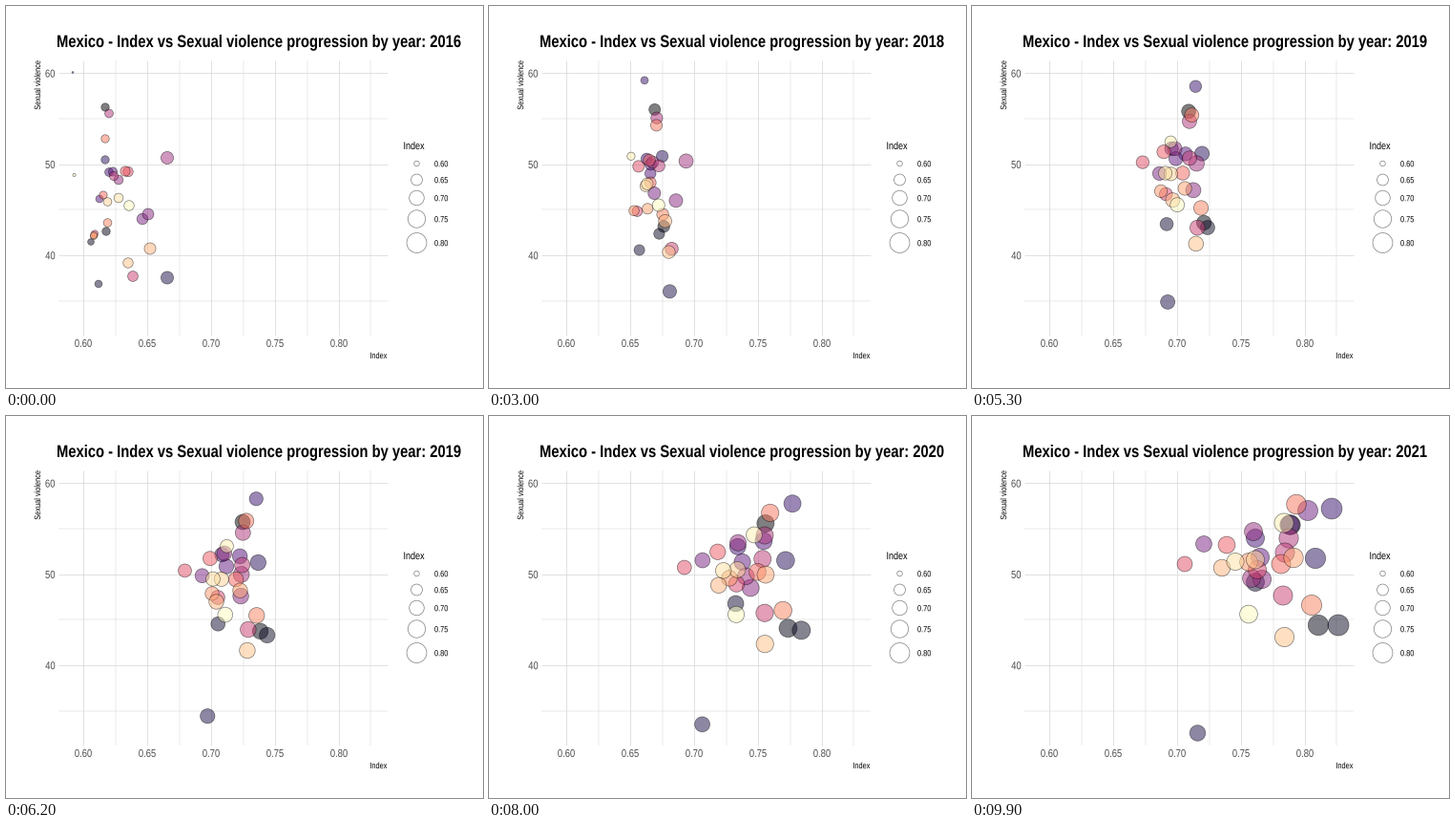
These frames come from a looping animation (500 by 400 pixels, 10 s). A matplotlib script:

```python
import matplotlib.pyplot as plt
import numpy as np
from matplotlib.animation import FuncAnimation
from matplotlib.patches import Circle, PathPatch
from matplotlib.textpath import TextPath
from matplotlib.transforms import Affine2D

W, H, DPI = 500, 400, 100
PX = 72 / DPI                      # one pixel in points
FRAMES, INTERVAL = 100, 100
FIRST_YEAR, LAST_YEAR = 2016, 2021
LEFT, RIGHT, TOP, BOTTOM = 54.5, 400, 56.5, 345
NARROW = 0.82                      # condensed cut of the sans face
EDGE = (0, 0, 0, 0.5)

# Start and end of each bubble on the stage, ordered along the palette.
BUBBLES = np.array([
    (104, 106, 334, 114), (105, 236, 363, 219), (89, 247, 384, 219),
    (97, 291, 297, 174), (169, 284.5, 236.5, 332), (104, 161, 360, 149),
    (70, 69.5, 377, 97), (108, 174, 297, 128), (98, 202, 333, 114),
    (112, 173.5, 302, 148), (352, 99, 352, 99), (143, 223, 243, 134),
    (149, 218, 304, 171), (118, 182, 295, 121), (169, 159, 293, 170),
    (108, 112.5, 332, 128), (113, 178, 328, 143), (133, 283, 326, 188),
    (93, 238.5, 299, 161), (128, 173.5, 223, 155), (125, 173, 267, 135),
    (102, 198, 324, 155), (104, 139, 340, 92.5), (106.5, 227, 356, 198),
    (92, 241, 290, 153), (92, 240, 337, 148.5), (151, 254, 262, 159),
    (128, 269, 327.5, 231.5), (106.5, 205, 297, 150.5),
    (118, 201, 276, 152.5), (71.5, 177, 327, 112), (129, 209, 290, 207.5),
])
LATE = 10                          # only present at the final moment


def sx(v):
    return 81 + (v - 0.6) * 1340


def sy(v):
    return 70.3 + (60 - v) * 9.53


def radius(x):
    """Area scale of the index, given its stage position."""
    lo, hi = 70, 384
    return 0.89 + 10.13 * np.sqrt(np.clip((x - lo) / (hi - lo), 0, 1))


def text_path(s, x, y, size, align=0.0, weight="normal", turn=0):
    path = TextPath((0, 0), s, size=size,
                    prop=dict(family="Liberation Sans", weight=weight))
    box = path.get_extents()
    shift = -align * (box.x0 + box.x1)
    move = Affine2D().translate(shift, 0).scale(NARROW, -1)
    return move.rotate_deg(-turn).translate(x, y).transform_path(path)


def text(*args, color="black", **kw):
    patch = PathPatch(text_path(*args, **kw), fc=color, lw=0, zorder=5)
    ax.add_patch(patch)
    return patch


def title_path(year):
    label = f"Mexico - Index vs Sexual violence progression by year: {year}"
    return text_path(label, 53, 43, 18, weight="bold")


fig = plt.figure(figsize=(W / DPI, H / DPI), dpi=DPI, facecolor="white")
ax = fig.add_axes([0, 0, 1, 1])
ax.set(xlim=(0, W), ylim=(H, 0))
ax.axis("off")

# Grid and axis labels
for i in range(10):
    v = 0.6 + 0.025 * i
    ax.vlines(sx(v), TOP, BOTTOM, color="#cccccc",
              lw=(0.43 if i % 2 else 0.57) * PX, zorder=1)
    if i % 2 == 0:
        text(f"{v:.2f}", sx(v), 357, 11.5, align=0.5, color="#4d4d4d")
for v in range(35, 61, 5):
    major = v % 10 == 0
    ax.hlines(sy(v), LEFT, RIGHT, color="#cccccc",
              lw=(0.57 if major else 0.43) * PX, zorder=1)
    if major:
        text(str(v), 51.5, sy(v) + 4.3, 11.5, align=1, color="#4d4d4d")
text("Index", 400, 369, 9, align=1)
text("Sexual violence", 36, 57, 9, align=1, turn=90)

# Size legend
text("Index", 416.5, 150, 11)
for v, y in zip((0.60, 0.65, 0.70, 0.75, 0.80), (165, 182, 201, 223, 248)):
    ax.add_patch(Circle((430.5, y), radius(sx(v)), fc="none", ec=EDGE,
                        lw=0.71 * PX))
    text(f"{v:.2f}", 449, y + 3.3, 9)

titles = {y: title_path(y) for y in range(FIRST_YEAR, LAST_YEAR + 1)}
title = PathPatch(titles[FIRST_YEAR], fc="black", lw=0, zorder=5)
ax.add_patch(title)

start, end = BUBBLES[:, :2], BUBBLES[:, 2:]
r_start, r_end = radius(start[:, 0]), radius(end[:, 0])
dots = []
for rgba in plt.get_cmap("magma")(np.linspace(0, 1, len(BUBBLES))):
    dot = Circle((0, 0), 1, fc=(*rgba[:3], 0.5), ec=EDGE, lw=0.71 * PX,
                 zorder=3)
    dots.append(ax.add_patch(dot))


def draw(frame):
    t = frame / (FRAMES - 1)
    year = FIRST_YEAR + t * (LAST_YEAR - FIRST_YEAR)
    title.set_path(titles[round(year)])
    pos = start + (end - start) * t
    size = r_start + (r_end - r_start) * t
    for dot, p, r in zip(dots, pos, size):
        dot.set_center(p)
        dot.set_radius(r)
    dots[LATE].set_visible(frame == FRAMES - 1)
    return [title, *dots]


anim = FuncAnimation(fig, draw, frames=FRAMES, interval=INTERVAL,
                     repeat=True, blit=False)
plt.show()
```
